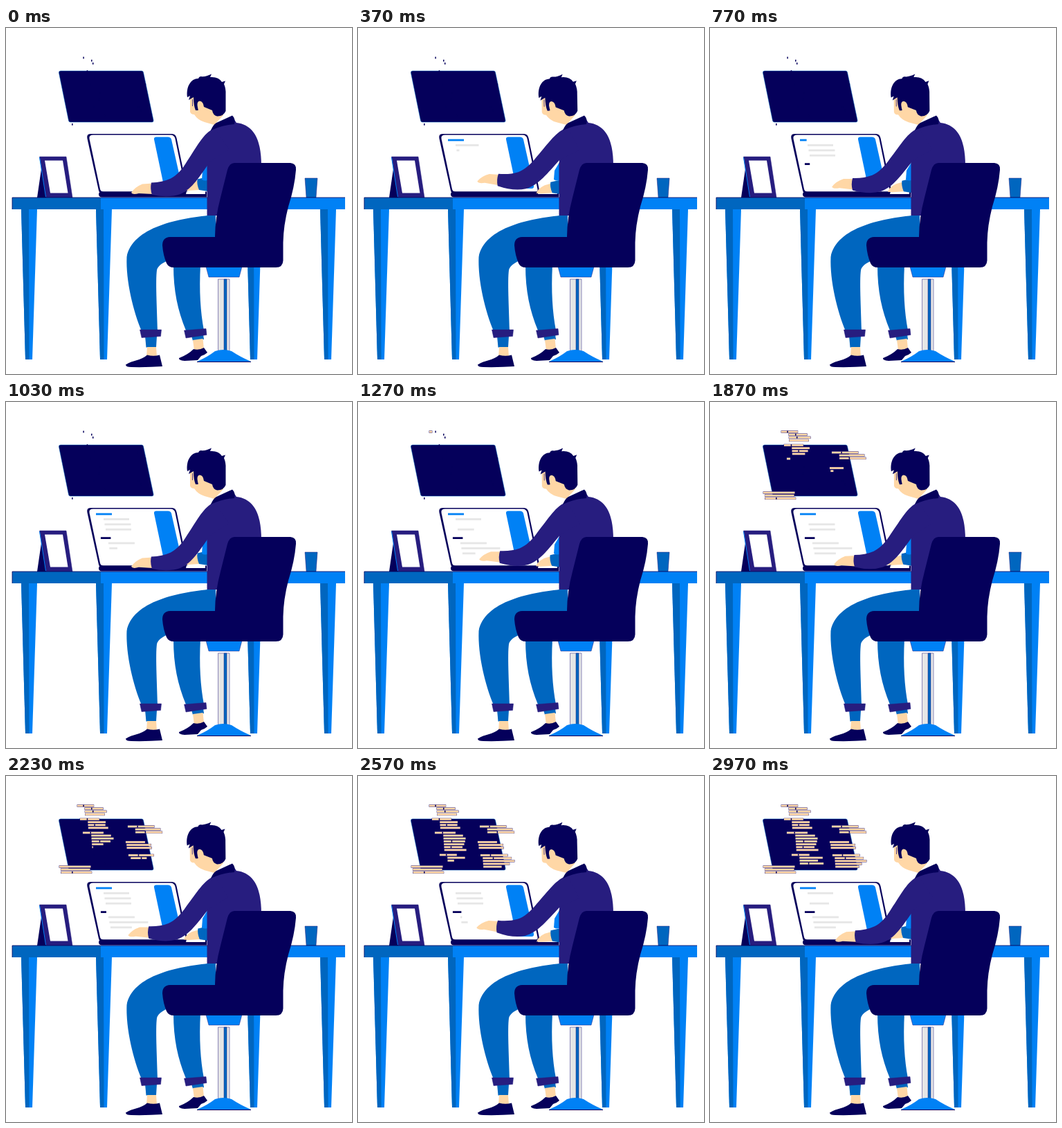
These frames come from a looping animation (500x500 px, 3.01 s). An HTML page:

```html
<!DOCTYPE html>
<html lang="en">
<head>
<meta charset="utf-8">
<title>Typing at a desk</title>
<style>
  html, body { margin: 0; width: 100%; height: 100%; overflow: hidden; background: #fff; }
  svg { display: block; width: 100vw; height: 100vh; }
  .navy { fill: #05005b; }
  .purple { fill: #271d7f; }
  .blue { fill: #0081f5; }
  .mid { fill: #0066bf; }
  .skin { fill: #ffd7a6; }
  .white { fill: #fff; }
  .grey { fill: #e6e6e6; }
  .edge { stroke: #271d7f; stroke-width: .5; }
  .code { fill: #ffd7a6; stroke: #271d7f; stroke-width: .8; paint-order: stroke; }
</style>
</head>
<body>
<svg viewBox="0 0 500 500" xmlns="http://www.w3.org/2000/svg">
  <!-- wall board -->
  <path class="navy" stroke="#0066bf" stroke-width=".5" d="M79 62H196Q198 62 198.500 64L213 133Q213.500 136 211 136H93Q91 136 90.500 134L76.500 65Q76 62 79 62Z"/>
  <g id="board"></g>

  <!-- laptop -->
  <path class="navy" d="M122 153H240Q245 153 246.500 159L262 234Q263 239 258 239H139Q135 239 134 235L117.500 160Q116 153 122 153Z"/>
  <path class="white" d="M126 154.500H238Q243 154.500 244.500 160L259.500 233Q260 236.500 257 236.500H141Q137 236.500 136 233L120.500 160Q119.500 154.500 126 154.500Z"/>
  <path class="blue" d="M217 157.500H234Q238 157.500 239 161L254 228Q254.500 232 251 232H232Q229 232 228.300 229L214 161Q213.500 157.500 217 157.500Z"/>
  <g id="screen"></g>
  <path class="navy" d="M138 236.500H290V244.500H138Q134 244 134 240.500Q134 236.500 138 236.500Z"/>
  <path class="white" d="M261 236H288V240H260Z"/>

  <!-- picture frame and cup -->
  <path class="navy" d="M53 190L45 245H59Z"/>
  <path class="purple edge" d="M48.500 186H87L96 245H58Z"/>
  <path d="M48.500 187L57.500 244" stroke="#0081f5" stroke-width="1"/>
  <path class="white" d="M56 191.500H82L89.500 238.500H64Z"/>
  <path class="mid edge" d="M432 217H450L448 245H434Z"/>

  <!-- desk -->
  <g id="legs"></g>
  <path class="blue" d="M9 245H490V262H9Z"/>
  <path class="mid" d="M9 245H137V262H9Z"/>
  <path d="M9 245H490M9 245V262" stroke="#05005b" stroke-width=".8"/>

  <!-- chair post and foot -->
  <path class="blue edge" d="M289 345H341L337 360H293Z"/>
  <path class="grey edge" d="M306.500 363H323V470H306.500Z"/>
  <path class="mid edge" d="M315 363H319V470H315Z"/>
  <path class="blue" d="M276 482Q292 475 302 467Q314 463 326 467Q338 475 354 482Z"/>
  <path d="M276 482.500H354" stroke="#05005b" stroke-width="1"/>

  <!-- far leg -->
  <path class="mid" d="M242 343H281C279 380 281 410 286 437H260C248 408 242 380 242 343Z"/>
  <path class="mid" d="M268 445L285 443L286 450L270 452Z"/>
  <path class="skin" d="M270 451L284.500 449L286 464L272 466Z"/>
  <path class="navy" d="M250 477Q263 472 271 464Q279 466 286 462L291 469Q288 472 282 474L277 480L258 481Q249 480 250 477Z"/>
  <path class="purple edge" d="M257.500 437L289 434.500L290 443.500L260 448Z"/>

  <!-- near leg -->
  <path class="mid" d="M303 270C250 274 182 288 174.500 331C173 365 184 410 196 438H219C218 400 216 366 218 350C221 338 240 336 250 325L303 303Z"/>
  <path class="mid" d="M201 445H218L217 461.500H202.500Z"/>
  <path class="skin" d="M204 461H217L218 475H203Z"/>
  <path class="navy" d="M173 486.500C182 480 195 481 204 472.500Q213 475 222 472.500L226 489Q205 490.500 181 490Q173 490 173 486.500Z"/>
  <path class="purple edge" d="M193.500 436H224.500L223.500 445.500L196 447.500Z"/>

  <!-- far arm -->
  <g id="farArm">
    <path class="skin" d="M279 220L268 223Q258 228 256 234.500L263 235L279 234Z"/>
    <path class="mid" d="M276.500 218.500L292 215V236L279 234Q275.500 226 276.500 218.500Z"/>
  </g>
  <path class="blue" d="M297 184L284 206L283 219Q288 222 293 219Z"/>

  <path class="purple" d="M296 147L329 131L333 137C353 139 363 154 366.500 172Q369 184 369 200L325 271H290.500V196Z"/>
  <g id="nearArm">
    <path class="skin" d="M212 224.500L197 225.500Q186 230 181 238Q183 241.500 192 239L212 240Z"/>
    <path class="purple" d="M301 145C285 152 277 170 262 192C255 204 247 213 238 217.500Q226 223 210 223.500Q208 232 211 241Q235 246 252 240C270 232 280 214 295 193L322 175Z"/>
  </g>

  <!-- head -->
  <g id="head">
    <path class="skin" d="M266 97V121Q267 125 272 125Q277 133 287 136L301 140L314 126L306 92Z"/>
    <path d="M269.500 103V113" stroke="#271d7f" stroke-width=".8"/>
    <path class="navy" d="M262 100C260 85 267 73 278 73Q279 70 282 70Q288 71 297 66.500L295 71Q307 70 312 78L317 76.500L315 81Q318 88 317.500 96V120Q314 128 305 127.500Q299 126 298 119L286 114L277 119H274Q271 112 271 100L264 104L266 98Z"/>
    <path class="skin" d="M277 115Q275 106 280 105.500Q285 106 286 114Q289 120 298 122V128H280Z"/>
  </g>
  <path class="navy" d="M296 148Q299 140 304 137L327 126.500Q332 131 330 139Q313 140 296 148Z"/>

  <!-- chair -->
  <path class="navy" d="M330 195H411Q420 196 419 205Q417 230 408 258Q401 285 400.500 310V336Q400 346 390 346H242Q235 346 232 340Q227 328 226 314Q226 302.500 237 302H302Q302 275 310 245L320 205Q323 195 330 195Z"/>
</svg>

<script>
const LOOP = 3010;
const NS = 'http://www.w3.org/2000/svg';
const $ = id => document.getElementById(id);
const clamp = v => Math.min(1, Math.max(0, v));

function add(parent, tag, attrs) {
  const el = document.createElementNS(NS, tag);
  for (const k in attrs) el.setAttribute(k, attrs[k]);
  parent.appendChild(el);
  return el;
}

function random(seed) {
  return () => (seed = seed * 16807 % 2147483647) / 2147483647;
}

// tapered desk legs, the left half in shade
for (const x of [22, 130, 347, 454]) {
  add($('legs'), 'path', { class: 'blue', d: `M${x} 262h23l-7 217h-10Z` });
  add($('legs'), 'path', { class: 'mid', d: `M${x} 262h11l0.5 217h-5.500Z` });
}

// A bar grows to the right; its setter takes the shown part, 0 to 1.
function bar(parent, cls, x, y, width, height) {
  const rect = add(parent, 'rect', { class: cls, x, y: y - height / 2, height });
  return part => {
    rect.setAttribute('width', width * part);
    rect.style.display = part > 0 ? '' : 'none';
  };
}

// Laptop text: width of each line, then the moments it is wiped and retyped.
const lines = [
  [23, 650, 2560], [37, 1860], [38, 1260, 2980], [37, 1430, 3150],
  [14.5, 2375], [38, 2510], [56, 2493], [31, 2580]
].map(([width, ...wipes], i) => {
  const heading = i % 4 === 0;
  const y = 162 + 7.4 * i + (i > 3 ? 5 : 0);
  const x = 130 + 0.2 * (y - 162) + (heading ? 0 : 9.5);
  const cls = i === 0 ? 'blue' : heading ? 'navy' : 'grey';
  return { draw: bar($('screen'), cls, x, y, width, 2.8), start: 30 + 160 * i, wipes };
});

// Code columns: start, delay per row, blocks of x, y, rows, indent, typical width
const columns = [
  [1250, 75, [[103, 43, 4, 10.5, 28], [107, 62.5, 4, 11, 28], [111, 82, 7, 12, 31], [118, 114, 4, 11, 30]]],
  [1465, 98, [[176, 73, 3, 10.5, 34], [173, 95.5, 3, 1, 31], [177, 114.5, 5, 3, 40]]],
  [1300, 150, [[77, 131, 3, 2, 40]]]
];
const rand = random(11);
const code = columns.flatMap(([start, step, blocks]) => {
  let time = start;
  return blocks.flatMap(([x, y, rows, indent, width]) => Array.from({ length: rows }, (_, i) => {
    const left = x + (i ? indent + 0.3 * i : 0);
    const w = width * (0.85 + 0.3 * rand());
    const row = { draw: bar($('board'), 'code', left, y + 4.15 * i, w, 2.7), start: time };
    // some rows have a space between two words
    if (rand() < 0.45) add($('board'), 'rect', { class: 'navy', x: left + w * 0.35, y: y + 4.15 * i - 1.4, width: 1.5, height: 2.8 });
    time += step;
    return row;
  }));
});

function render(t) {
  // three typing strokes per loop
  const up = (1 - Math.cos(t / LOOP * 6 * Math.PI)) / 2;
  $('nearArm').setAttribute('transform', `rotate(${8.4 * up} 310 160)`);
  $('farArm').setAttribute('transform', `translate(${2 * up} ${5 * up})`);
  $('head').setAttribute('transform', `rotate(${-1.4 * up} 305 132)`);

  for (const { draw, start, wipes } of lines) {
    const kept = wipes.map(w => clamp((Math.abs(t - w) - 50) / 170));
    draw(Math.min(clamp((t - start) / 200), ...kept));
  }
  for (const { draw, start } of code) draw(1 - (1 - clamp((t - start) / 240)) ** 2);
}

const begin = performance.now();
function tick() {
  render((performance.now() - begin) % LOOP);
  requestAnimationFrame(tick);
}
render(0);
requestAnimationFrame(tick);
</script>
</body>
</html>
```
